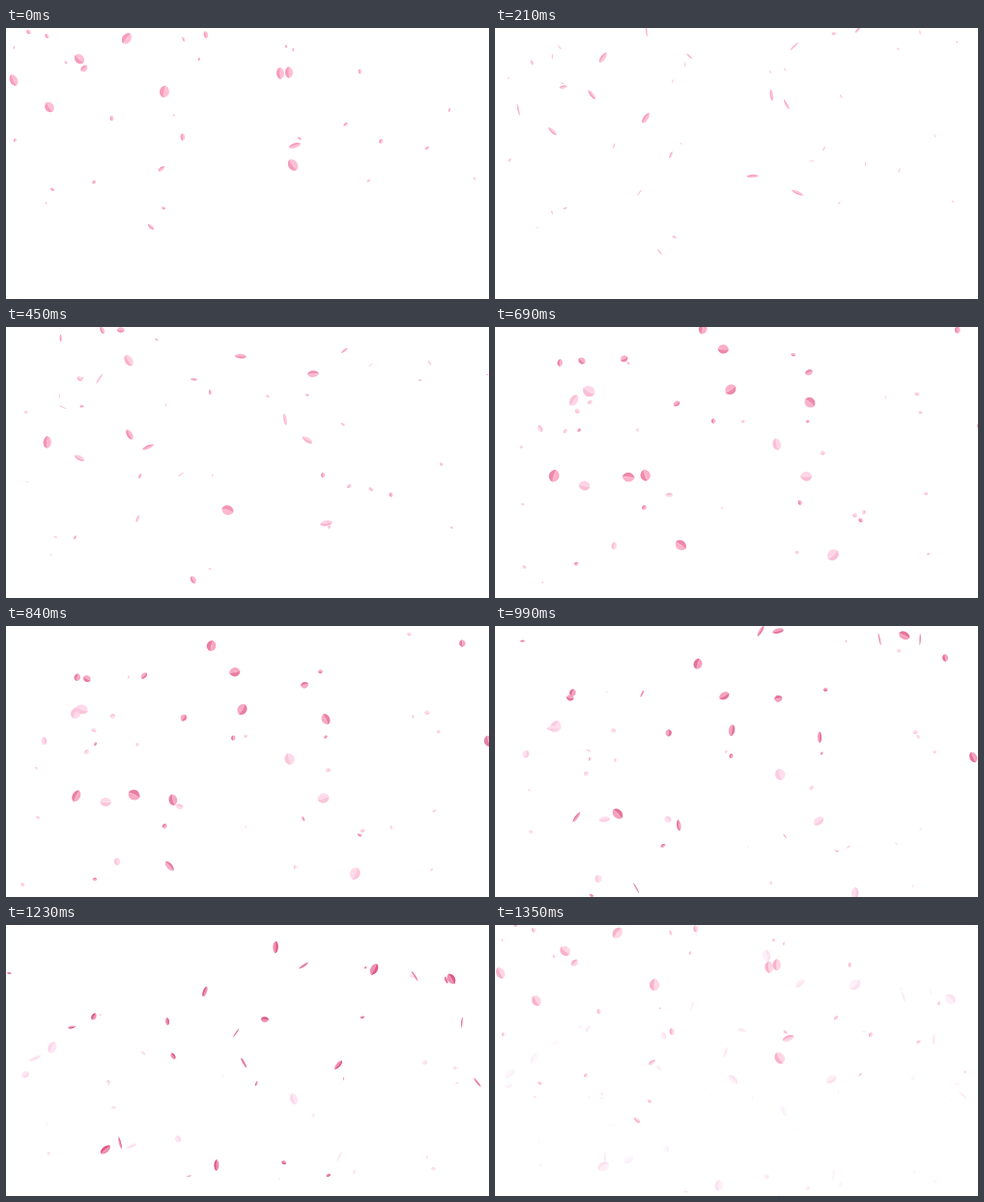
Animation of 500 by 281 pixels, one loop 1.38 s. Source, as an HTML page with a canvas:

```html
<!DOCTYPE html>
<html lang="en">
<head>
<meta charset="utf-8">
<title>Falling petals</title>
<style>
html, body { margin: 0; width: 100%; height: 100%; overflow: hidden; background: #fff; }
canvas { display: block; width: 500px; height: 281px; }
</style>
</head>
<body>
<canvas id="stage" width="500" height="281"></canvas>
<script>
const LOOP = 1380, STEP = 30, FADE = 150, FALL = LOOP - FADE;
const W = 500, H = 281;
const ctx = document.getElementById('stage').getContext('2d');

const PINK = { light: [255, 190, 213], dark: [247, 156, 188] };
const PALE = { light: [255, 230, 243], dark: [253, 216, 235] };
const ROSE = { light: [241, 142, 174], dark: [219, 92, 134] };
const LILAC = [253, 232, 250];

let seed = 11;
function rnd(min, max) {
  seed = (seed * 16807) % 2147483647;
  return min + (max - min) * seed / 2147483647;
}

const mix = (a, b, k) => a + (b - a) * k;
const blend = (a, b, k) => a.map((c, i) => mix(c, b[i], k));
const clamp = v => Math.min(1, Math.max(0, v));

const petals = [];

// One petal falls straight from (x0, y0) to (x1, y1) while it tumbles.
function addPetal(len, end, [x0, y0, x1, y1]) {
  petals.push({
    len: len * rnd(0.93, 1.07), end, x0, y0, x1, y1,
    angle: Math.atan2(y1 - y0, x1 - x0) + rnd(-0.5, 0.5),
    spin: rnd(-3, 3),
    flip: rnd(0.4, 1.1),
    tumble: rnd(2, 4)
  });
}

function addGroup(len, end, ...paths) {
  paths.forEach(path => addPetal(len, end, path));
}

// Near petals that grow pale
addGroup(12.5, PALE,
  [45, 82, 130, 229], [284, 47, 298, 180], [293, 46, 345, 240],
  [297, 142, 391, 310], [125, 11, 48, 127], [183, -25, 30, 138]);
addGroup(8, PALE, [183, 113, 178, 222], [161, 146, 94, 290], [81, 42, 20, 155]);

// Near petals that deepen, many of them starting above the stage
addGroup(12, ROSE,
  [299, 122, 109, 308], [76, 32, 218, 249], [164, 66, 118, 226],
  [8, 54, 103, 233], [303, -7, 344, 145], [241, -35, 246, 143],
  [227, -84, 206, 69], [234, -91, 238, 112], [468, -118, 381, 46],
  [427, -168, 423, 53], [231, -147, 308, 42], [258, -69, 279, 23],
  [652, -79, 472, 101], [353, -159, 461, 56], [525, 25, 488, 163]);
addGroup(8, ROSE,
  [207, 7, 173, 136], [150, 206, 270, 359], [398, -18, 268, 98],
  [37, -37, 91, 95], [91, -53, 167, 100], [118, -56, 68, 106],
  [508, -66, 456, 57]);

// Distant specks
for (let i = 0; i < 36; i++) {
  const x = rnd(0, W), y = rnd(-150, 190);
  addPetal(rnd(2, 5.5), i % 3 ? PALE : ROSE,
    [x, y, x + rnd(-150, 150), y + rnd(120, 190)]);
}

function half(r, w, inner) {
  ctx.beginPath();
  ctx.moveTo(-r, 0);
  ctx.bezierCurveTo(-r * 0.7, w * 1.3, r * 0.75, w * 1.35, r, 0);
  ctx.quadraticCurveTo(0, inner, -r, 0);
  ctx.fill();
}

function draw(p, t) {
  const k = t / FALL, sec = t / 1000;
  const x = mix(p.x0, p.x1, k), y = mix(p.y0, p.y1, k);
  if (x < -10 || x > W + 10 || y < -10 || y > H + 10) return;

  const r = p.len / 2;
  const open = Math.abs(Math.cos(p.flip + p.tumble * sec));
  const w = Math.max(0.4, r * 0.85 * Math.max(0.14, open));
  const age = clamp(k);
  const tone = p.end === ROSE ? age * age : age;
  const leaving = clamp((t - FALL) / FADE);
  const colour = part =>
    `rgb(${blend(blend(PINK[part], p.end[part], tone), LILAC, leaving).map(Math.round)})`;

  ctx.save();
  ctx.globalAlpha = clamp((t + FADE) / FADE) ** 2 * (1 - leaving ** 2);
  ctx.translate(x, y);
  ctx.rotate(p.angle + p.spin * sec);
  ctx.fillStyle = colour('light');
  half(r, w, 0);
  half(r, -w, 0);
  ctx.fillStyle = colour('dark');
  half(r, w, w * 0.35);
  ctx.restore();
}

function render(now) {
  const t = Math.floor((now % LOOP) / STEP) * STEP;
  ctx.fillStyle = '#fff';
  ctx.fillRect(0, 0, W, H);
  for (const p of petals) {
    draw(p, t);
    if (t > FALL) draw(p, t - LOOP); // next round fades in
  }
}

const start = performance.now();
function tick() {
  render(performance.now() - start);
  requestAnimationFrame(tick);
}
tick();
</script>
</body>
</html>
```
